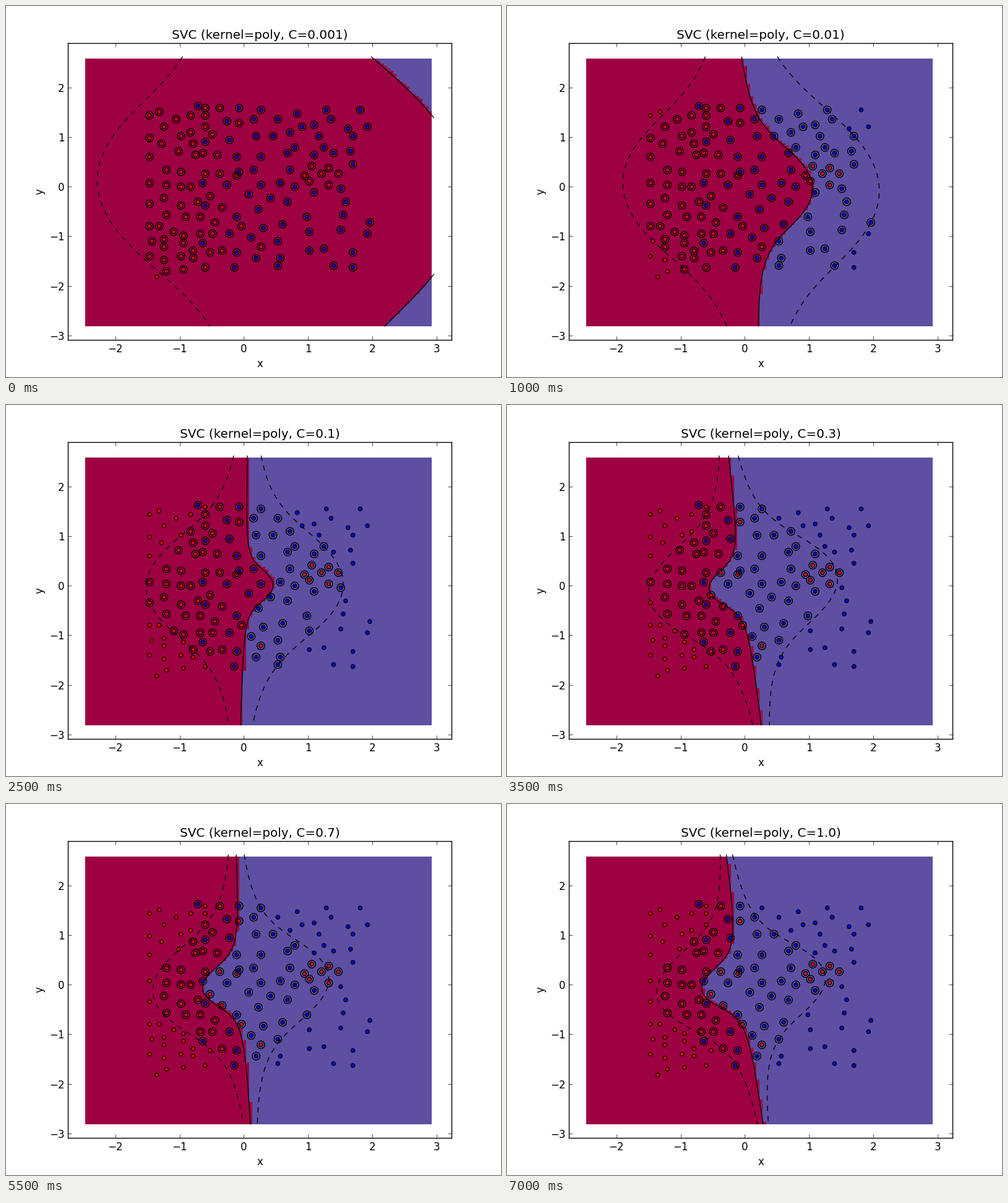
A matplotlib script for the animation above (7500 ms loop, 800x600 px).

```python
import numpy as np
import matplotlib.pyplot as plt
from matplotlib.animation import FuncAnimation
from matplotlib.colors import ListedColormap

plt.rcParams.update({
    "font.family": "DejaVu Sans", "font.size": 12, "axes.titlesize": 14.4,
    "axes.linewidth": 1, "axes.titlepad": 5, "axes.labelpad": 5,
    "xtick.direction": "in", "ytick.direction": "in",
    "xtick.top": True, "ytick.right": True,
    "xtick.major.size": 4, "ytick.major.size": 4,
    "xtick.major.width": 0.5, "ytick.major.width": 0.5,
    "xtick.major.pad": 4, "ytick.major.pad": 4,
})

COSTS = [0.001, 0.005, 0.01, 0.025, 0.05] + [k / 10 for k in range(1, 11)]
GAMMA = 0.5

# Sample positions on an integer grid (column, row from the top).
RED = [
    (0, 5), (4, 3), (11, 7), (17, 5), (23, 1), (23, 5), (29, 1), (37, 9),
    (26, 15), (23, 11), (17, 14), (13, 16), (6, 11), (5, 20), (0, 17), (0, 27),
    (12, 24), (18, 20), (19, 26), (22, 25), (28, 26), (67, 32), (74, 33), (78, 36),
    (71, 36), (64, 37), (66, 40), (74, 42), (36, 37), (29, 36), (23, 36), (17, 43),
    (13, 43), (13, 35), (7, 34), (7, 42), (0, 41), (0, 52), (6, 49), (7, 58),
    (13, 53), (20, 51), (25, 48), (30, 54), (38, 64), (27, 62), (26, 68), (21, 59),
    (15, 59), (21, 68), (10, 67), (14, 69), (14, 73), (6, 71), (4, 64), (0, 64),
    (1, 72), (6, 75), (0, 80), (6, 82), (3, 91), (7, 88), (13, 80), (14, 87),
    (18, 77), (18, 81), (25, 78), (23, 86), (30, 77), (46, 75),
]
BLUE = [
    (20, 0), (37, 1), (32, 8), (43, 7), (46, 2), (53, 7), (61, 4), (68, 10),
    (73, 2), (75, 7), (87, 2), (90, 11), (82, 12), (84, 16), (70, 16), (63, 11),
    (58, 14), (51, 16), (44, 16), (33, 18), (23, 19), (36, 27), (46, 27), (57, 25),
    (60, 22), (68, 26), (72, 22), (76, 25), (83, 24), (84, 31), (79, 44), (68, 46),
    (60, 43), (58, 34), (43, 34), (37, 35), (22, 41), (32, 42), (23, 53), (36, 59),
    (41, 47), (46, 42), (54, 41), (50, 49), (45, 55), (57, 51), (55, 63), (47, 65),
    (42, 70), (33, 68), (22, 73), (36, 78), (35, 86), (44, 81), (53, 72), (54, 81),
    (53, 85), (66, 67), (65, 59), (66, 77), (72, 76), (76, 85), (84, 78), (84, 86),
    (79, 66), (80, 58), (81, 51), (90, 68), (91, 62),
]

X = np.array(RED + BLUE, float) * (1, -1)
X = (X - X.mean(axis=0)) / X.std(axis=0)
LABELS = np.repeat([-1.0, 1.0], [len(RED), len(BLUE)])


def cubic(x, y):
    """Feature map of the kernel (GAMMA * <u, v>) ** 3."""
    r3 = np.sqrt(3)
    return GAMMA ** 1.5 * np.stack([x**3, r3 * x**2 * y, r3 * x * y**2, y**3], axis=-1)


def train(cost, tol=1e-3, eps=1e-12):
    """Fit a soft-margin SVC by SMO; returns weights, bias, support mask."""
    phi = cubic(*X.T)
    K = phi @ phi.T
    diag = np.diag(K)
    lo, hi = np.minimum(0, cost * LABELS), np.maximum(0, cost * LABELS)
    beta, v = np.zeros(len(X)), LABELS.copy()
    for _ in range(30000):
        up, low = beta < hi - eps, beta > lo + eps
        i = np.argmax(np.where(up, v, -np.inf))
        gap = np.where(low, v[i] - v, 0)
        if gap.max() < tol:
            break
        quad = np.maximum(K[i, i] + diag - 2 * K[i], eps)
        j = np.argmax(np.where(gap > 0, gap**2 / quad, -1))
        step = min(gap[j] / quad[j], hi[i] - beta[i], beta[j] - lo[j])
        beta[i] += step
        beta[j] -= step
        v -= step * (K[i] - K[j])
    free = up & low
    bias = v[free].mean() if free.any() else (v[up].max() + v[low].min()) / 2
    return beta @ phi, bias, np.abs(beta) > 1e-9


MODELS = [train(c) for c in COSTS]

(x0, y0), (x1, y1) = X.min(axis=0) - 1, X.max(axis=0) + 1
cols, rows = np.arange(x0, x1, 0.05), np.arange(y0, y1, 0.05)
cell_phi = cubic(*np.meshgrid(cols[:-1], rows[:-1]))
fx, fy = np.meshgrid(np.linspace(x0, x1, 200), np.linspace(y0, y1, 200))
fine_phi = cubic(fx, fy)

fig, ax = plt.subplots(figsize=(8, 6), dpi=100, facecolor="white")
fig.subplots_adjust(left=0.125, right=0.9, bottom=0.1, top=0.9)
mx, my = 0.05 * (x1 - x0), 0.05 * (y1 - y0)
ax.set(xlim=(x0 - mx, x1 + mx), ylim=(y0 - my, y1 + my),
       xticks=range(-2, 4), yticks=range(-3, 3), xlabel="x", ylabel="y")

mesh = ax.pcolormesh(cols, rows, np.zeros(cell_phi.shape[:2]), vmin=0, vmax=1,
                     cmap=ListedColormap(["#9e0142", "#5e4fa2"]), zorder=0)
ax.scatter(*X.T, s=20, c=np.where(LABELS > 0, "blue", "red"),
           edgecolors="black", linewidths=1, zorder=10)
rings = ax.scatter([], [], s=80, facecolors="none", edgecolors="black",
                   linewidths=1, zorder=11)
title = ax.set_title("")
lines = None


def draw(n):
    global lines
    w, bias, support = MODELS[n]
    mesh.set_array((cell_phi @ w + bias > 0).astype(float))
    if lines is not None:
        lines.remove()
    dash = (0, (6, 6))
    lines = ax.contour(fx, fy, fine_phi @ w + bias, levels=[-1, 0, 1], colors="black",
                       linewidths=1, linestyles=[dash, "-", dash], zorder=2)
    rings.set_offsets(X[support])
    title.set_text(f"SVC (kernel=poly, C={COSTS[n]})")
    return mesh, rings, title


anim = FuncAnimation(fig, draw, frames=len(COSTS), interval=500, repeat=True,
                     repeat_delay=0, blit=False)
plt.show()
```
